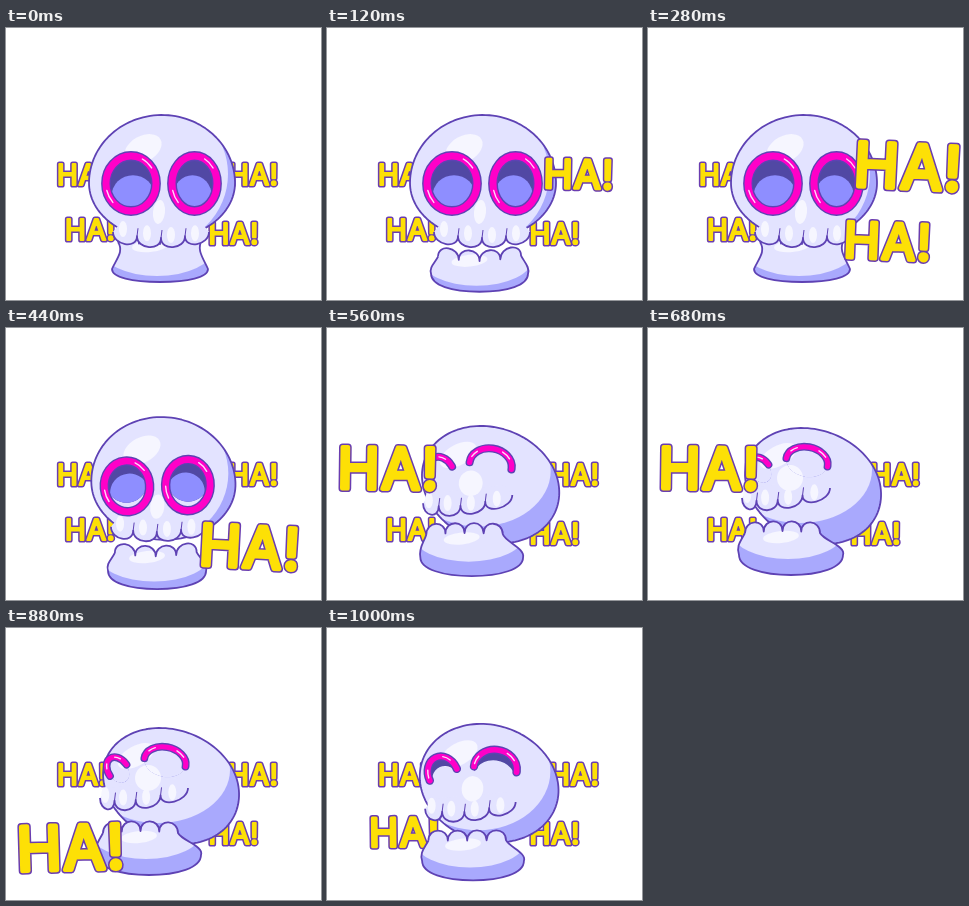
Recreate the animation shown at these times as an HTML page with a canvas. Size 315 by 272 pixels, loop 1040 ms.

```html
<!DOCTYPE html>
<html lang="en">
<head>
<meta charset="utf-8">
<title>Laughing skull</title>
<style>
html, body { margin: 0; width: 100%; height: 100%; overflow: hidden; background: #fff; }
canvas { display: block; width: 315px; height: 272px; }
</style>
</head>
<body>
<canvas id="stage"></canvas>
<script>
const W = 315, H = 272, LOOP = 1040, STEP = 40;
const LINE = '#5e42b4', BODY = '#e3e3ff', SHADE = '#a9a9fd', GLOSS = '#f6f6ff';
const canvas = document.getElementById('stage');
const ctx = canvas.getContext('2d');
const dpr = window.devicePixelRatio || 1;
canvas.width = W * dpr;
canvas.height = H * dpr;

const mix = (a, b, k) => a + (b - a) * k;
const clamp = v => Math.max(0, Math.min(1, v));
const smooth = v => clamp(v) ** 2 * (3 - 2 * clamp(v));
const swell = v => Math.sin(Math.PI * clamp(v));

function blend(a, b, k) {
  const out = {};
  for (const key in a) out[key] = mix(a[key], b[key], k);
  return out;
}

// Motion: the head turns back and returns, the jaw chatters, the eyes narrow
const turn = t => smooth((t - 380) / 240) - clamp((t - 880) / 160) ** 4;
const chatter = t => Math.abs(Math.sin(Math.PI * t / 280));
const squintAt = t => swell((t - 340) / 200);
const pop = (t, word) => swell((t - word.at) / 360);

const HEAD = {
  front: { x: 156, y: 155, rx: 73, top: 68, bottom: 56, skew: 0 },
  back: { x: 165, y: 156, rx: 67, top: 56, bottom: 60, skew: .2 }
};
const TEETH = {
  front: { x0: 107, y0: 204, x1: 203, y1: 204, arch: 6, bunch: 1 },
  back: { x0: 94, y0: 170, x1: 182, y1: 160, arch: 6, bunch: 1.3 }
};
const JAW = {
  shut: { x0: 112, y0: 214, x1: 196, y1: 212, arch: 3, bunch: 1, left: 106, right: 202, side: 241, bottom: 254, flare: -6 },
  open: { x0: 111, y0: 229, x1: 194, y1: 228, arch: 5, bunch: 1, left: 104, right: 201, side: 246, bottom: 264, flare: 3 },
  back: { x0: 97, y0: 205, x1: 172, y1: 205, arch: -2, bunch: 1, left: 91, right: 195, side: 227, bottom: 247, flare: 4 }
};
const EYES = [
  {
    front: { x: 125, y: 155.5, rx: 25, ry: 27.5, tilt: 0, ring: 7 },
    back: { x: 112, y: 142, rx: 10, ry: 14, tilt: -.6, ring: 5 }
  },
  {
    front: { x: 188.5, y: 155.5, rx: 22.5, ry: 27.5, tilt: 0, ring: 7 },
    back: { x: 159, y: 134, rx: 21, ry: 15, tilt: .2, ring: 5 }
  }
];
const WORDS = [
  { at: 80, rest: [247, 147], big: [260, 138], tilt: .05 },
  { at: 200, rest: [227.5, 206], big: [246, 223], tilt: .06 },
  { at: 440, rest: [76, 147], big: [58.5, 138], tilt: .015 },
  { at: 680, rest: [84, 202], big: [64, 220], tilt: -.03 }
];

// Five gaps between four teeth, along an arched line
function gaps(row) {
  return [0, 1, 2, 3, 4].map(i => {
    const u = (i / 4) ** row.bunch;
    return [mix(row.x0, row.x1, u), mix(row.y0, row.y1, u) + row.arch * swell(i / 4)];
  });
}

function scallops(path, points, depth) {
  const d = depth * 1.33;
  for (let i = 1; i < points.length; i++) {
    const [a, b] = [points[i - 1], points[i]];
    path.bezierCurveTo(a[0], a[1] + d, b[0], b[1] + d, b[0], b[1]);
  }
}

function blob(x, y, rx, ry, color, tilt = 0) {
  ctx.fillStyle = color;
  ctx.beginPath();
  ctx.ellipse(x, y, rx, ry, tilt, 0, 7);
  ctx.fill();
}

function outline(path, width = 1.8) {
  ctx.strokeStyle = LINE;
  ctx.lineWidth = width;
  ctx.stroke(path);
}

// Shaded shape with details clipped to it
function solid(path, paint) {
  ctx.save();
  ctx.clip(path);
  ctx.fillStyle = SHADE;
  ctx.fill(path);
  paint();
  ctx.restore();
  outline(path);
}

function drawHead(k) {
  const h = blend(HEAD.front, HEAD.back, k);
  const path = new Path2D();
  for (let a = 0; a < Math.PI * 2; a += .05) {
    const dy = Math.sin(a) * (Math.sin(a) < 0 ? h.top : h.bottom);
    path.lineTo(h.x + h.rx * Math.cos(a) + h.skew * dy, h.y + dy);
  }
  path.closePath();
  solid(path, () => {
    blob(mix(150, 152, k), mix(146, 142, k), 72, mix(72, 53, k), BODY);
    blob(mix(137, 130, k), mix(121, 128, k), 20, mix(13, 10, k), GLOSS, -.5);
  });
}

function drawJaw(k, open) {
  const j = blend(blend(JAW.shut, JAW.open, open), JAW.back, k);
  const mid = (j.left + j.right) / 2, dy = j.side - j.y0, round = (j.bottom - j.side) * .65;
  const path = new Path2D();
  path.moveTo(j.x0, j.y0);
  scallops(path, gaps(j), -10);
  path.bezierCurveTo(j.x1 + j.flare, j.y1 + dy * .35, j.right + j.flare * .8, j.side - dy * .4, j.right, j.side);
  path.bezierCurveTo(j.right, j.side + round, mid + 28, j.bottom, mid, j.bottom);
  path.bezierCurveTo(mid - 28, j.bottom, j.left, j.side + round, j.left, j.side);
  path.bezierCurveTo(j.left - j.flare * .8, j.side - dy * .4, j.x0 - j.flare, j.y0 + dy * .35, j.x0, j.y0);
  solid(path, () => {
    blob(mid - 3, j.bottom - mix(33, 43, k), 56, 27, BODY);
    blob(mid - 10, j.y0 + 4, 18, 6, GLOSS, -.1);
  });
}

function drawFace(k) {
  const p = gaps(blend(TEETH.front, TEETH.back, k));
  const [first, last] = [p[0], p[4]];
  const edge = new Path2D();
  edge.moveTo(...first);
  scallops(edge, p, 10);
  const fill = new Path2D(edge);
  fill.lineTo(last[0] - 8, last[1] - 10);
  fill.lineTo(first[0] + 8, first[1] - 10);
  fill.closePath();
  ctx.fillStyle = BODY;
  ctx.fill(fill);
  outline(edge);
  for (const [x, y] of p.slice(1, 4)) {
    const crease = new Path2D();
    crease.moveTo(x, y);
    crease.lineTo(x + 1, y - 8);
    outline(crease, 1);
  }
  for (let i = 0; i < 4; i++) {
    blob((p[i][0] + p[i + 1][0]) / 2 - 2, p[i][1] - 3, 4, 8, GLOSS);
  }
  blob(mix(153, 142, k), mix(184, 150, k), mix(6, 13, k), mix(12, 13, k), GLOSS, .1);
}

function drawEye(eye, k, squint) {
  const { x, y, rx, ry, tilt, ring } = blend(eye.front, eye.back, k);
  const half = mix(Math.PI, 1.6, clamp((k - .17) / .38));
  const oval = dy => {
    ctx.beginPath();
    ctx.ellipse(0, dy, rx, ry, 0, 0, 7);
  };
  const stroke = (color, width, from, to) => {
    ctx.beginPath();
    ctx.ellipse(0, 0, rx, ry, 0, from, to);
    ctx.strokeStyle = color;
    ctx.lineWidth = width;
    ctx.stroke();
  };
  ctx.save();
  ctx.translate(x - 2 * squint, y + 5 * squint);
  ctx.rotate(tilt);

  ctx.save();
  oval(0);
  ctx.clip();
  oval(-9 * squint);
  ctx.clip();
  // The cheek rises over the socket until only a crescent is left
  oval(mix(2 * ry + 3, 0, smooth((k - .15) / .8)));
  ctx.rect(-60, -60, 120, 120);
  ctx.clip('evenodd');
  blob(0, 0, rx, ry, '#5148a4');
  blob(x < 150 ? 2 : -2, ry * .46 - 5 * squint, rx * .86, ry * .76, '#8e8eff');
  ctx.restore();

  const from = -Math.PI / 2 - half, to = -Math.PI / 2 + half;
  ctx.lineCap = 'round';
  stroke(LINE, ring + 2.8, from, to);
  stroke('#ff00c8', ring, from, to);
  stroke('#ffd9fa', 1.4, -1.1, -.6);
  stroke('#ffd9fa', 1.4, mix(-3.9, -2.6, k), mix(-3.4, -2.2, k));
  ctx.restore();
}

function drawWord(word, t) {
  const p = pop(t, word), s = 1 + 1.18 * p;
  ctx.save();
  ctx.translate(mix(word.rest[0], word.big[0], p), mix(word.rest[1], word.big[1], p * p));
  ctx.rotate(word.tilt * p);
  ctx.scale(s, s);
  ctx.font = '400 28px Inter, "Open Sans", sans-serif';
  ctx.letterSpacing = '0.8px';
  ctx.textAlign = 'center';
  ctx.strokeStyle = '#6a3db0';
  ctx.lineWidth = 2.2 + 3 / s;
  ctx.strokeText('HA!', .4, 10.2);
  ctx.strokeStyle = ctx.fillStyle = '#fde006';
  ctx.lineWidth = 2.2;
  ctx.strokeText('HA!', .4, 10.2);
  ctx.fillText('HA!', .4, 10.2);
  ctx.restore();
}

function draw(t) {
  const k = turn(t);
  const inFront = w => t - w.at >= 40 && t - w.at < 280;
  ctx.setTransform(dpr, 0, 0, dpr, 0, 0);
  ctx.fillStyle = '#fff';
  ctx.fillRect(0, 0, W, H);
  ctx.lineJoin = 'round';
  WORDS.filter(w => !inFront(w)).forEach(w => drawWord(w, t));
  drawHead(k);
  drawJaw(k, chatter(t));
  drawFace(k);
  EYES.forEach(e => drawEye(e, k, squintAt(t)));
  WORDS.filter(inFront).forEach(w => drawWord(w, t));
}

const start = performance.now();
function tick() {
  const t = (performance.now() - start) % LOOP;
  draw(Math.floor(t / STEP) * STEP);
  requestAnimationFrame(tick);
}
tick();
</script>
</body>
</html>
```
